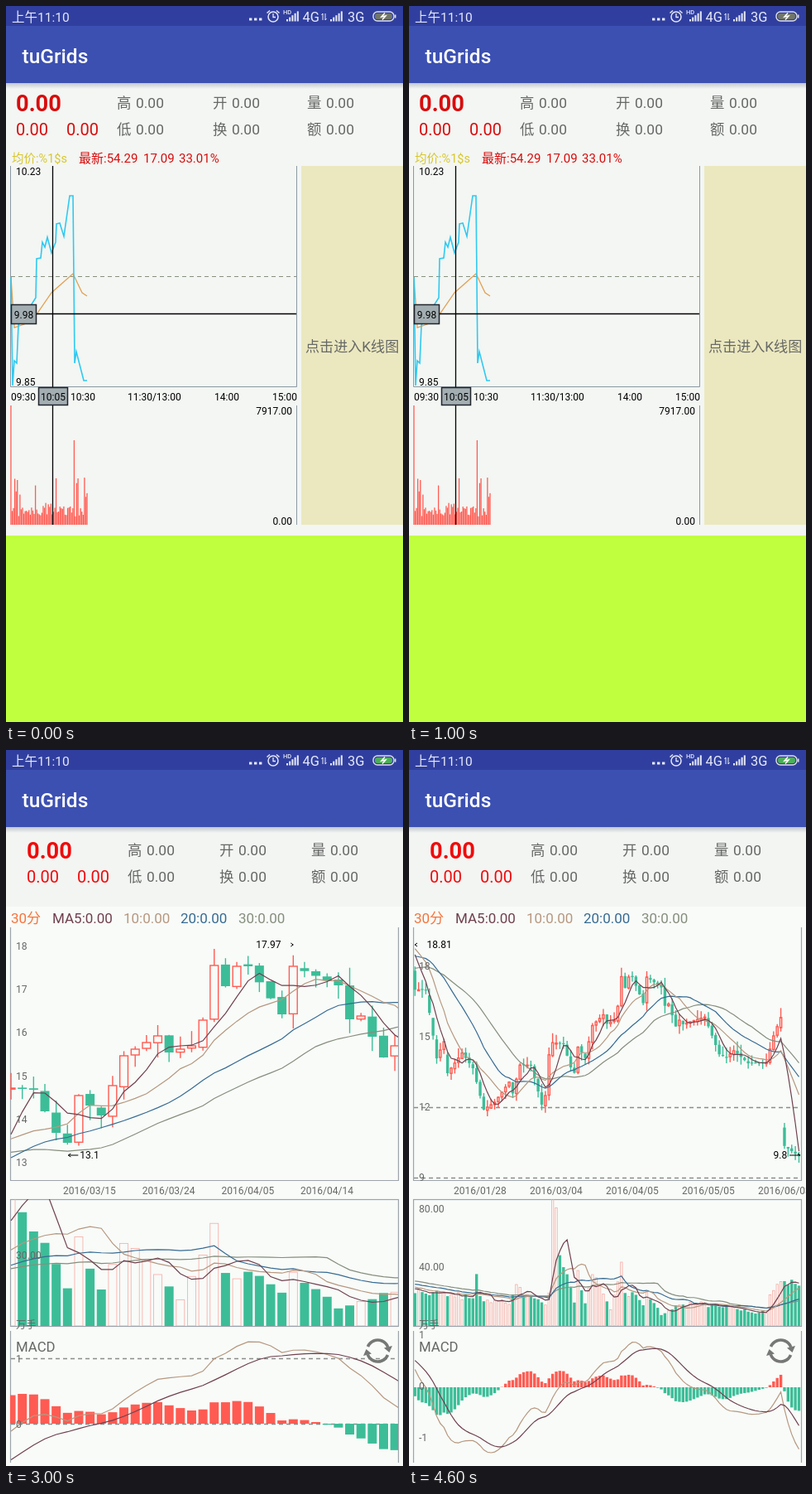
Write an HTML page with a canvas that moves like this. It is 480 px wide and 864 px high and loops after 5000 ms.

```html
<!DOCTYPE html>
<html lang="zh-CN">
<head>
<meta charset="utf-8">
<style>
html, body { margin: 0; width: 100%; height: 100%; overflow: hidden; background: #f8fbf8; }
canvas { display: block; }
</style>
</head>
<body>
<canvas id="stage" width="480" height="864"></canvas>
<script>
const g = document.getElementById('stage').getContext('2d');
const RED = '#d80c0c', GREY = '#666866', BLACK = '#000', PAPER = '#f8fbf8';
const UP = '#ff5b52', DOWN = '#3cbd98', EDGE = '#9ca3ab', LIGHT = '#e6e9f8';
const MAROON = '#70404f', TAN = '#b8977f', BLUE = '#376b93', SAGE = '#868e7d';

// ---- helpers ----
function text(s, x, y, size, color, weight = 400, align = 'left') {
  g.font = `${weight} ${size}px Roboto, "Noto Sans CJK SC", "Noto Sans CJK", sans-serif`;
  g.fillStyle = color;
  g.textAlign = align;
  g.fillText(s, x, y);
}
function rect(x, y, w, h, color) {
  g.fillStyle = color;
  g.fillRect(x, y, w, h);
}
function box(x, y, w, h, color, width = 1.2) {
  g.strokeStyle = color;
  g.lineWidth = width;
  g.strokeRect(x, y, w, h);
}
function line(points, color, width = 1, dash = []) {
  g.beginPath();
  for (let i = 0; i < points.length; i += 2) g.lineTo(points[i], points[i + 1]);
  g.strokeStyle = color;
  g.lineWidth = width;
  g.setLineDash(dash);
  g.stroke();
  g.setLineDash([]);
}
function tag(s, x, y, w, h, fill, baseline) {
  rect(x, y, w, h, fill);
  box(x + .5, y + .5, w - 1, h - 1, '#20242c', 1.5);
  text(s, x + w / 2, baseline, 12, BLACK, 400, 'center');
}
function clipped(x, y, w, h, draw) {
  g.save();
  g.beginPath();
  g.rect(x, y, w, h);
  g.clip();
  draw();
  g.restore();
}
function noise(n) {
  const v = Math.sin(n * 12.9898 + 4.1) * 43758.5453;
  return v - Math.floor(v);
}
// Linear interpolation in a flat list of x, y pairs
function along(p, x) {
  let k = 0;
  while (k < p.length - 4 && x > p[k + 2]) k += 2;
  const t = Math.max(0, Math.min(1, (x - p[k]) / (p[k + 2] - p[k])));
  return p[k + 1] + (p[k + 3] - p[k + 1]) * t;
}

// ---- daily data: turning points as bar index, height; bar 0 opens the close-up ----
const FIRST = -70, LAST = 66;
const closeKeys = [-70, 331, -46, 176, -41, 198, -40, 289, -37, 290, -34, 442, -32, 405, -31, 475,
  -27, 430, -24, 464, -21, 556, -18, 540, -14, 495, -13, 520, -11, 457, -8, 457, -5, 545, -4, 525,
  -3, 434, -2, 407, 1, 410, 3, 462, 4, 474, 5, 417, 7, 441, 9, 369, 12, 345, 13, 365, 15, 357, 16, 326,
  17, 260, 18, 285, 19, 261, 20, 261, 23, 319, 24, 261, 28, 284, 29, 325, 30, 321, 32, 371, 33, 357,
  34, 366, 40, 350, 44, 433, 46, 440, 48, 425, 52, 453, 57, 451, 59, 392, 61, 351, 62, 637, 66, 660];
const volumeKeys = [-70, 105, -40, 70, -24, 55, -23, 90, -22, 55, -14, 45, -12, 90, -10, 62, -4, 43,
  -3, 66, -2, 240, -1, 205, 0, 145, 4, 50, 5, 114, 7, 41, 9, 107, 11, 85, 14, 35, 17, 123, 18, 65,
  21, 61, 23, 39, 24, 60, 28, 22, 34, 44, 45, 40, 52, 28, 57, 26, 58, 64, 61, 88, 66, 76];

const bars = [];
let fast = closeKeys[1], slow = fast, dea = 0;
for (let i = FIRST; i <= LAST; i++) {
  const close = along(closeKeys, i);
  const open = Math.max(along(closeKeys, i - 1), close - 41) + (noise(i) - .5) * 5;
  // MACD(12, 26, 9)
  fast += (close - fast) * 2 / 13;
  slow += (close - slow) * 2 / 27;
  const dif = (slow - fast) * 2.16;
  dea += (dif - dea) * .2;
  bars.push({
    open, close, dif, dea,
    high: Math.min(open, close) - noise(i + 200) * 22,
    low: Math.max(open, close) + noise(i + 400) * 18,
    volume: along(volumeKeys, i) * (.88 + .24 * noise(i + 600))
  });
}
function mean(field, n, i) {
  let sum = 0;
  for (let k = 0; k < n; k++) sum += bars[i - FIRST - k][field];
  return sum / n;
}

// ---- shared parts ----
function signalBars(x) {
  for (let i = 0; i < 5; i++) rect(x + i * 3.2, 16 - i * 2.4, 2, 2.5 + i * 2.4, LIGHT);
}
function header(battery) {
  const shade = g.createLinearGradient(0, 93, 0, 100);
  shade.addColorStop(0, 'rgba(40,50,90,.24)');
  shade.addColorStop(1, 'rgba(40,50,90,0)');
  rect(0, 93, 480, 7, shade);
  rect(0, 0, 480, 24, '#303f9f');
  rect(0, 24, 480, 69, '#3c50b2');
  text('上午11:10', 7, 18.5, 15.5, LIGHT);
  text('tuGrids', 19.5, 69, 24.5, '#fff', 500);
  for (const x of [294, 300, 306]) rect(x, 14.5, 3.4, 3, LIGHT);
  g.beginPath();
  g.arc(323, 13, 6, 0, 7);
  g.strokeStyle = LIGHT;
  g.lineWidth = 1.5;
  g.stroke();
  line([323, 9, 323, 13.5, 326, 13.5], LIGHT, 1.3);
  line([315.5, 8.5, 319, 5.5], LIGHT, 1.5);
  line([327, 5.5, 330.5, 8.5], LIGHT, 1.5);
  text('HD', 335, 10, 7.5, LIGHT, 500);
  signalBars(339);
  text('4G', 358.5, 18.5, 16.4, LIGHT);
  line([383, 17, 383, 9, 381.5, 11], LIGHT);
  line([386, 9, 386, 17, 387.5, 15], LIGHT);
  signalBars(392);
  text('3G', 413, 18.5, 16.4, LIGHT);
  g.beginPath();
  g.roundRect(444, 7, 25, 11, 5);
  g.strokeStyle = '#dfe2df';
  g.lineWidth = 1.4;
  g.stroke();
  g.beginPath();
  g.roundRect(446, 9, 21, 7, 3);
  g.fillStyle = battery;
  g.fill();
  rect(470, 10.5, 1.5, 4, '#dfe2df');
  line([458, 8.5, 454, 13, 459, 12, 455, 16.5], '#fff', 1.5);
}
function quote(price, values, x, columns, dy, red) {
  text(price, x, 127 + dy, 27.3, red, 700);
  text('0.00', x, 156 + dy, 20, red);
  text('0.00', x + 61, 156 + dy, 20, red);
  [...'高开量低换额'].forEach((name, i) => {
    const left = columns[i % 3], y = (i < 3 ? 123 : 155) + dy;
    text(name, left, y, 17.4, GREY);
    text(values[i], left + 23, y, 17.4, GREY);
  });
}
const zeros = Array(6).fill('0.00');

// ---- minute chart ----
function minuteChart() {
  rect(0, 0, 480, 864, '#f3f6f3');
  rect(0, 639, 480, 225, '#c0ff3e');
  header('#70766c');
  quote('0.00', zeros, 12, [134, 250, 364], 0, RED);
  text('均价:%1$s', 7, 189, 14.5, '#d8c62a');
  text('最新:54.29', 88, 189, 15, RED);
  text('17.09', 166, 189, 15, RED);
  text('33.01%', 209, 189, 15, RED);

  rect(357, 193, 123, 433, '#ebe8bf');
  text('点击进入K线图', 362, 416.5, 17.1, GREY);
  line([5.5, 193, 5.5, 459.5, 351.5, 459.5, 351.5, 193], '#8b98a3');
  line([351.5, 482, 351.5, 626], '#8b98a3');
  line([6, 326.5, 351, 326.5], '#88907f', 1, [5, 4]);

  line([6, 327, 10, 388, 22, 384, 37, 372, 55, 346, 81, 323, 92, 346, 98, 350], '#e3a052', 1.3);
  line([6, 327, 8, 458, 10, 428, 13, 431, 15, 385, 36, 352, 37, 305, 42, 304, 44, 285, 47, 291, 50, 279,
    55, 298, 60, 285, 61, 263, 65, 262, 70, 278, 77, 229, 81, 229, 83, 431, 85, 417, 94, 452, 98, 452],
    '#2fc9f0', 1.6);

  // Volume: opening spike, then a second one when the price falls
  for (let i = 0; i < 60; i++) {
    const spike = i === 0 ? 144 : i === 49 ? 102 : i > 49 ? 58 * noise(i) : 0;
    const h = Math.max(spike, 9 + 14 * noise(i) + 45 * noise(i + 90) ** 6);
    rect(5.3 + i * 1.56, 626 - h, 1.3, h, UP);
  }

  line([56.5, 193, 56.5, 626], BLACK, 1.3);
  line([6, 371.5, 351, 371.5], BLACK, 1.3);
  text('10.23', 12, 204, 12, BLACK);
  text('9.85', 12, 458, 12, BLACK);
  ['09:30', '10:30', '11:30/13:00', '14:00', '15:00'].forEach((s, i) =>
    text(s, [6, 78, 147, 252, 322][i], 476, 12, BLACK));
  text('7917.00', 346, 492.5, 12, BLACK, 400, 'right');
  text('0.00', 346, 626, 12, BLACK, 400, 'right');
  tag('9.98', 6, 360, 31, 24, '#a3aeb2', 376.5);
  tag('10:05', 39, 460, 36, 22, '#a3aeb2', 476);
}

// ---- daily chart ----
// Labels: [first value, step, first baseline, spacing, count]
const closeUp = {
  step: 13.65, width: 11, from: -1, to: 34,
  priceY: y => y, volumeZoom: 1, macdZero: 813, macdZoom: 1,
  prices: [18, -1, 241, 52.2, 6], volumes: [['30.00', 614]], macd: [1, -1, 739, 79, 2],
  dashes: [734.5, 813.5],
  dates: ['03/15', '03/24', '04/05', '04/14', '04/25'], dateStep: 95.7
};
const plain = {
  price: '0.00', values: zeros, legend: zeros, legendX: [56, 142, 211, 281]
};
const picked = {
  ...closeUp, x: 8, dateX: 58, cross: true,
  price: '17.55', values: ['17.60', '17.09', '21.67', '16.95', '0.00', '0.00'],
  legend: ['17.13', '17.09', '16.36', '15.80'], legendX: [56, 152, 231, 310]
};
const moved = { ...closeUp, ...plain, x: 19.7, dateX: 69, dates: closeUp.dates.slice(0, 4) };
const wide = {
  ...plain, x: 182.4, step: 4.38, width: 3.4, from: -40, to: LAST,
  priceY: y => 261 + (y - 237) * .542, volumeZoom: .622, macdZero: 769, macdZoom: .55,
  prices: [18, -3, 265, 85, 4], volumes: [['80.00', 558], ['40.00', 628]], macd: [1, -1, 710, 62, 3],
  dashes: [431.5, 516.5],
  dates: ['01/28', '03/04', '04/05', '05/05', '06/03'], dateX: 54, dateStep: 92
};

function scale([value, step, y, gap, count]) {
  for (let i = 0; i < count; i++) text(value + i * step, 12, y + i * gap, 12.2, GREY);
}

function refreshIcon() {
  g.save();
  g.translate(449.5, 725);
  g.strokeStyle = g.fillStyle = '#767876';
  g.lineWidth = 3.6;
  for (let i = 0; i < 2; i++) {
    g.beginPath();
    g.arc(0, 0, 13, -2.75, -.35);
    g.stroke();
    g.beginPath();
    g.moveTo(7.5, -3.5);
    g.lineTo(17.5, -6);
    g.lineTo(14, 2);
    g.fill();
    g.rotate(Math.PI);
  }
  g.restore();
}

function dailyChart(v) {
  const xAt = i => v.x + i * v.step;
  const half = v.width / 2;
  const volumeY = h => 695 - h * v.volumeZoom;
  const macdY = h => v.macdZero - h * v.macdZoom;
  const each = draw => {
    for (let i = v.from; i <= v.to; i++) {
      const b = bars[i - FIRST];
      draw(b, xAt(i), b.close <= b.open);
    }
  };
  const curve = (valueAt, color) => {
    const p = [];
    for (let i = v.from; i <= v.to; i++) p.push(xAt(i), valueAt(i));
    line(p, color, 1.2);
  };
  const averages = (field, map) => [[30, SAGE], [20, BLUE], [10, TAN], [5, MAROON]].forEach(([n, color]) =>
    curve(i => map(mean(field, n, i)), color));

  rect(0, 0, 480, 864, PAPER);
  rect(0, 93, 480, 96, '#f3f5f3');
  header('#4cae5c');
  quote(v.price, v.values, 25, [147, 258, 369], 3.5, '#f00a0a');
  text('30分', 6, 209, 17, '#f8733a');
  ['MA5:', '10:', '20:', '30:'].forEach((s, i) =>
    text(s + v.legend[i], v.legendX[i], 209, 17, [MAROON, TAN, BLUE, SAGE][i]));

  line([5.5, 214, 5.5, 519.5, 474.5, 519.5, 474.5, 214], EDGE, 1.2);
  box(5.5, 542.5, 469, 153, EDGE);
  for (const x of [5.5, 474.5]) line([x, 701, x, 860], EDGE, 1.2);
  for (const y of v.dashes) line([6, y, 474, y], '#8b8d8b', 1.4, [5, 4]);

  clipped(5, 214, 469, 305, () => {
    each((b, x, up) => {
      const top = v.priceY(Math.min(b.open, b.close));
      const h = Math.max(1.2, v.priceY(Math.max(b.open, b.close)) - top);
      line([x, v.priceY(b.high), x, v.priceY(b.low)], up ? UP : DOWN, 1.4);
      rect(x - half, top, v.width, h, up ? PAPER : DOWN);
      if (up) box(x - half + .6, top, v.width - 1.2, h, UP, 1.4);
    });
    averages('close', v.priceY);
  });

  clipped(5, 542, 469, 153, () => {
    each((b, x, up) => {
      const top = volumeY(b.volume);
      if (up) box(x - half + .5, top, v.width - 1, 695 - top, '#f8aaa3', .8);
      else rect(x - half, top, v.width, 695 - top, DOWN);
    });
    averages('volume', volumeY);
  });

  clipped(5, 701, 469, 160, () => {
    each((b, x) => {
      const bar = b.dif - b.dea;
      rect(x - half, v.macdZero, v.width, macdY(bar) - v.macdZero, bar > 0 ? UP : DOWN);
    });
    curve(i => macdY(bars[i - FIRST].dif), TAN);
    curve(i => macdY(bars[i - FIRST].dea), MAROON);
  });

  scale(v.prices);
  scale(v.macd);
  for (const [s, y] of [...v.volumes, ['万手', 698]]) text(s, 12, y, 12.2, GREY);
  text('MACD', 12, 726, 16.8, GREY);
  v.dates.forEach((d, i) => text('2016/' + d, v.dateX + i * v.dateStep, 536, 12, GREY));

  if (v === wide) {
    line([10, 233, 7, 235, 10, 237], BLACK);
    text('18.81', 21.5, 239, 12, BLACK);
    text('9.8', 440.5, 493, 12, BLACK);
    line([460, 489, 473, 489, 470, 487], BLACK);
  } else {
    const peak = xAt(24), dip = xAt(4);
    text('17.97', peak - 45, 239, 12, BLACK);
    line([peak - 3, 233, peak, 235, peak - 3, 237], BLACK);
    line([dip + 4, 487, dip + 1, 489, dip + 4, 491], BLACK);
    line([dip + 1, 489, dip + 13, 489], BLACK);
    text('13.1', dip + 15, 493, 12, BLACK);
  }
  refreshIcon();

  if (v.cross) {
    line([267.5, 214, 267.5, 860], BLACK, 1.3);
    line([6, 360.5, 474, 360.5], BLACK, 1.3);
    tag('15.66', 6, 348, 37, 25, '#a8b2bd', 365);
    tag('2016/04/01', 233, 520, 69, 18, '#a8b0bd', 536);
  }
}

const scenes = [
  minuteChart,
  minuteChart,
  () => dailyChart(picked),
  () => dailyChart(moved),
  () => dailyChart(wide)
];
function frame() {
  scenes[Math.floor(performance.now() / 1000) % scenes.length]();
  requestAnimationFrame(frame);
}
frame();
</script>
</body>
</html>
```
